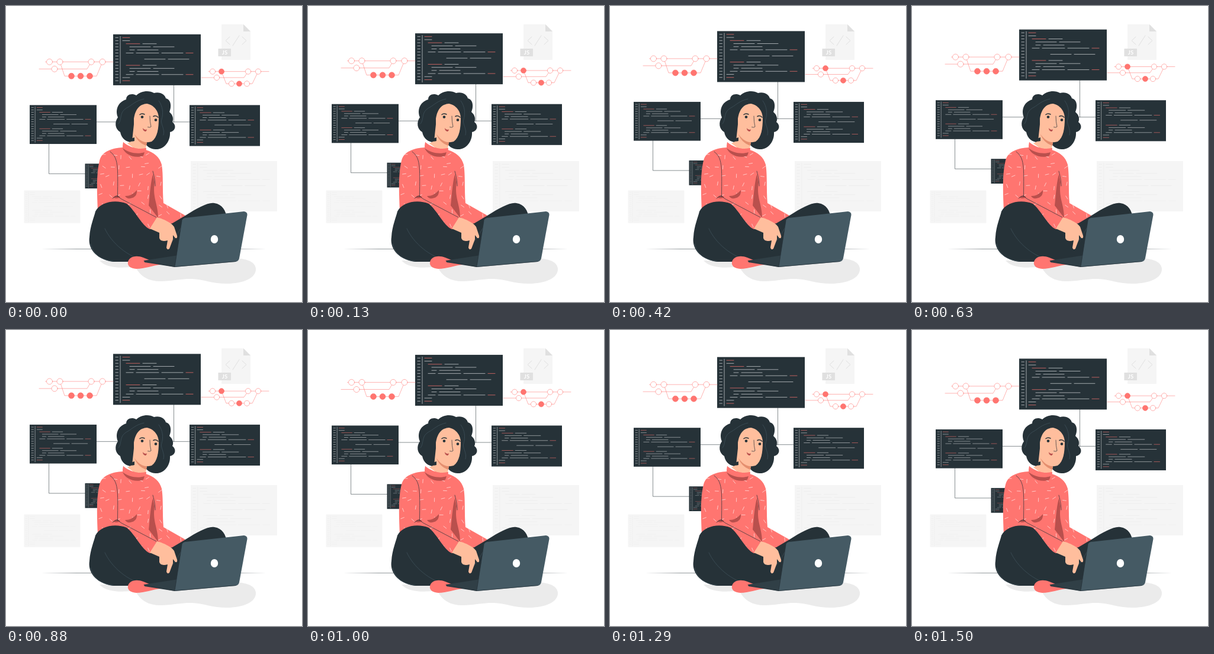
An HTML page that plays this animation: 500 px wide and 500 px high, repeating every 1540 ms.

```html
<!DOCTYPE html>
<html lang="en">
<head>
<meta charset="utf-8">
<title>Developer at work</title>
<style>
  html, body { margin: 0; height: 100%; overflow: hidden; background: #fff; }
  svg { display: block; width: 100%; height: 100%; fill: none; }
  .dark { fill: #263238; }
  .coral { fill: #ff7570; }
  .shade { fill: #b9504d; }
  .skin { fill: #ffbe9d; }
  .ink { stroke: #263238; stroke-width: .7; }
  .brow { stroke: #263238; stroke-width: 1.5; }
  .seam { stroke: #455a64; stroke-width: .6; }
  .link { stroke: #263238; stroke-width: .55; }
</style>
</head>
<body>
<svg viewBox="0 0 500 500" stroke-linecap="round" stroke-linejoin="round">
  <g id="pale"></g>

  <!-- script file -->
  <path d="M364 31H401L413 43V91H364Z" fill="#f5f5f5"/>
  <path d="M401 31L413 43H401Z" fill="#e0e0e0"/>
  <path d="M378 52L371 58.500L378 65M394 50L383 67M399 52L406 58.500L399 65" stroke="#e0e0e0"/>
  <rect x="358.500" y="72" width="21.500" height="13" fill="#e0e0e0"/>
  <text x="369.500" y="82" text-anchor="middle" fill="#fff" font-family="Lato, sans-serif" font-size="9.500" font-weight="700">JS</text>

  <path d="M59 410.300L120 410H380L440 410.300L380 410.600H120Z" class="dark"/>
  <path d="M158 430C172 446 203 441 219 441C227 458 243 466 264 465C296 463 310 457 340 465C380 475 424 466 422 443C419 425 390 424 340 427Z" fill="#ebebeb"/>

  <g id="floating">
    <path d="M283.500 134V196M153 196H310M72.500 233V283.500H134" class="link"/>
  </g>

  <!-- head -->
  <path d="M203 158C203 149 213 147 220 151C228 143 242 142 250 147C260 144 269 150 270 156C279 158 280 170 276 179C281 183 284 190 281 196C288 201 287 211 277 213C278 229 267 243 252 242C241 241 234 235 234 224L217 230C206 232 195 225 193 213C184 208 183 196 189 188C184 176 189 162 203 158Z" class="dark"/>
  <path d="M216 200L213 228L205 232L220 243L236 241L239 225Z" class="skin"/>
  <path d="M204 226Q211 230 217 228V222Z" class="dark"/>
  <path d="M217 216C224 226 231 230 238 230L237 236C226 232 220 225 217 216Z" fill="#e58f6f"/>
  <path d="M216 190C219 172 227 166 238 165C250 167 258 178 258 190C258 206 256 222 246 229C234 233 222 226 216 214Z" class="skin"/>
  <path d="M233 157C219 160 213 167 206 171C190 179 197 190 190 199M258 160C265 170 266 181 263 191C260 199 269 207 266 218" class="seam"/>
  <g class="dark">
    <circle cx="230" cy="187.500" r="2.300"/>
    <circle cx="253" cy="192.500" r="2.300"/>
  </g>
  <path d="M226 183.500Q229 181 234 183M249 186.500Q253 184 257 188" class="brow"/>
  <path d="M243 186Q243 196 245 204Q243 206 239.500 204.500" class="ink"/>
  <path d="M231 206Q233 210 238 208.500Q237 213 234 211.500Q231 210 231 206Z" class="shade"/>

  <!-- sweater -->
  <clipPath id="clip"><path id="torso" d="M198 230C210 240 224 243 237 240L236 243C250 247 260 256 263 268C266 285 264 310 266 333L303 354L285 368L256 370L243 378L200 375L155 347C154 318 152 285 158 261C162 245 180 240 197 239Z"/></clipPath>
  <use href="#torso" class="coral"/>
  <g id="ticks" clip-path="url(#clip)" stroke="#fff" stroke-width=".6"></g>
  <path d="M198 230C210 240 224 243 237 240L236 248C222 250 207 246 197 239Z" class="coral"/>
  <path d="M197 240C207 248 222 251 234 247L232 253C218 258 202 252 197 240Z" class="shade"/>
  <path d="M201 321Q213 321 221 311Q222 323 210 325Q204 326 201 321ZM248 284C243 305 243 322 241 337L257 358C257 334 247 324 251 298ZM181 324Q188 316 193 324L186 325Z" class="shade"/>
  <path d="M176 246C190 257 189 270 188.500 322M180 325Q188 317 193 325L254 357M248 279C251 290 252 296 252 304" class="ink"/>

  <!-- legs -->
  <path d="M151 347C159 331 185 326 204 334C218 345 230 372 243 377L281 367L303 354C325 340 342 331 352 333C365 335 372 345 373 360L300 420L290 432H180C150 427 138 408 141 390C142 372 149 356 151 347Z" class="dark"/>
  <path d="M167 376C178 400 205 424 237 431M143 402C147 420 162 430 181 431M281 397C289 387 294 378 297 371" class="seam"/>
  <path d="M206 433C207 424 219 420 232 425L262 437C247 438 235 444 220 444C210 443 205 439 206 433Z" class="coral"/>

  <!-- laptop -->
  <path d="M233 430L291 421L285 441L234 433Z" fill="#303f46"/>
  <path d="M302 358L402 347Q408 348 407.500 353L394 426Q393 431 388 432L285 441L297 363Q298 359 302 358Z" fill="#455a64"/>
  <path d="M233 430.500L285 440.500L297 363M285 440.500L388 431.500" class="ink"/>
  <ellipse cx="352" cy="394" rx="6.200" ry="7" fill="#fff"/>

  <!-- hand -->
  <path d="M255 357L243 376L259 383L259 392Q261 399 273 396L271 408Q272 413 276 410L282 394L282 387L286 392Q290 393 289 388L284 373C280 366 264 359 255 357Z" class="skin"/>
</svg>
<script>
const PERIOD = 1540, LEAD = 40, RISE = 10, REST = .4;
const CORAL = '#ff7570';
const get = id => document.getElementById(id);
const add = (parent, markup) => parent.insertAdjacentHTML('beforeend', markup);

// A code window: fifteen evenly spaced rows, mirrored header and footer, two equal blocks
function panel(parent, x, y, width, [fill, text, accent]) {
  let body = `<rect width="148" height="86" fill="${fill}"/><path d="M12 3.500V82.500" stroke="${text}"/>`;
  const run = (row, left, widths, hot) => widths.forEach((w, i) => {
    body += `<path d="M${left} ${5.5 + row * 5.2}h${w}" stroke="${i === hot ? accent : text}"/>`;
    left += w + 5;
  });
  for (let row = 0; row < 15; row++) run(row, 4, [4.5]);
  for (const row of [0, 1, 13, 14]) run(row, 16, [12], row % 14 ? -1 : 0);
  for (const row of [2, 9]) {
    run(row, 22, [23, 23], 0);
    run(row + 1, 28, [35, 35]);
    run(row + 2, 28, [8, 35]);
    run(row + 3, 22, [12, 38, 36, 12], 3);
  }
  run(7, 53, [35, 35]);
  add(parent, `<g transform="translate(${x} ${y}) scale(${width / 148})" stroke-width=".7">${body}</g>`);
}

// A branch graph: three lanes, the lower two joining the main one
function graph(parent, y, gap, r, main, side, step, isSolid) {
  const [a, b, c, d] = main, [y1, y2] = [y + gap, y + 2 * gap];
  const lines = `M${a - 7} ${y}H${d + 18}M${side - 26} ${y1}H${c - 7}L${c} ${y}M${b} ${y}L${b + 8} ${y2}H${d - 10}L${d} ${y}`;
  const dot = (x, cy) =>
    `<circle cx="${x}" cy="${cy}" r="${r}" fill="${isSolid(x, cy > y1) ? CORAL : '#fff'}"/>`;
  const low = [0, 1, 2].map(i => dot(b + 4 + step * (i + 1), y2));
  add(parent, `<g stroke="${CORAL}" stroke-width=".55"><path d="${lines}"/>
    ${main.map(x => dot(x, y)).join('')}${dot(side, y1)}${low.join('')}</g>`);
}

const light = ['#f5f5f5', '#ebebeb', '#ebebeb'], night = ['#263238', '#d9dcde', CORAL];
const pale = get('pale'), floating = get('floating');
panel(pale, 312, 262, 146, light);
panel(pale, 30.5, 311.5, 95, light);
panel(floating, 181, 48, 148, night);
panel(floating, 40, 167.5, 113, night);
panel(floating, 310, 167.5, 119, night);
panel(floating, 133.5, 266.5, 72, night);
graph(floating, 94.5, 12, 5, [73.5, 91, 144, 163], 82, 15.5, (x, low) => low);
graph(floating, 110.8, 10.3, 4.6, [349, 364, 409, 426], 356, 13, x => x === 364 || x === 394);

// Scattered knit marks
let seed = 11;
const random = () => (seed = seed * 16807 % 2147483647) / 2147483647;
for (let y = 248; y < 375; y += 16)
  for (let x = 158; x < 300; x += 16) {
    const a = random() * Math.PI, px = x + random() * 9, py = y + random() * 9;
    add(get('ticks'), `<path d="M${px} ${py}l${6 * Math.cos(a)} ${6 * Math.sin(a)}"/>`);
  }

function draw() {
  const phase = (performance.now() + LEAD) % PERIOD / PERIOD;
  const lift = RISE * (1 - Math.abs(1 - 2 * phase));
  floating.setAttribute('transform', `translate(0 ${REST - lift})`);
  requestAnimationFrame(draw);
}
draw();
</script>
</body>
</html>
```
